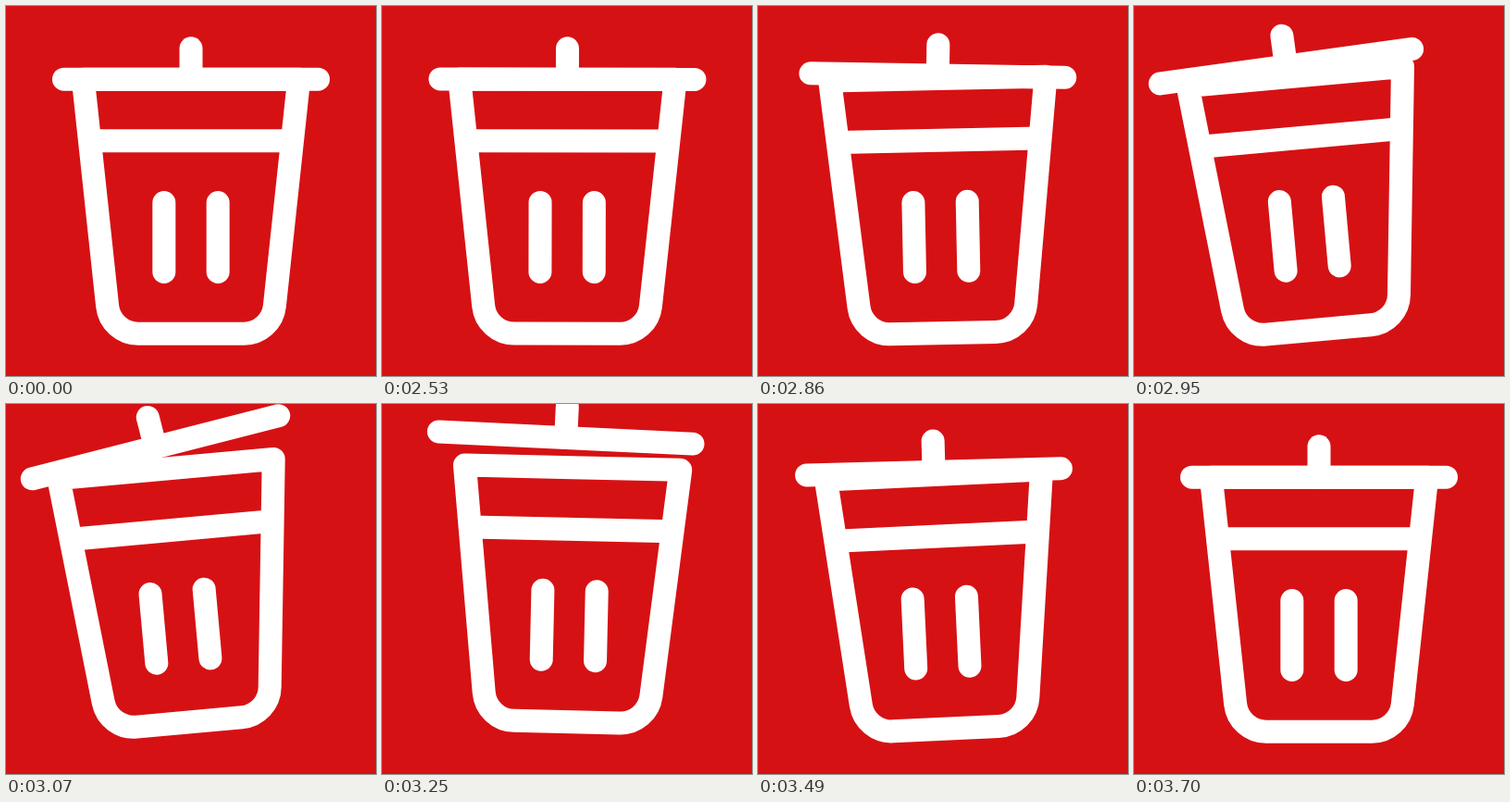
Animation, 400 px wide and 400 px high, one loop 3760 ms. Source, as an HTML page with a canvas:

```html
<!DOCTYPE html>
<html lang="en">
<head>
<meta charset="utf-8">
<title>Shaking bin</title>
<style>
  html, body { margin: 0; width: 100%; height: 100%; overflow: hidden; background: #d61114; }
  canvas { display: block; width: 100vmin; height: 100vmin; }
</style>
</head>
<body>
<canvas id="stage" width="400" height="400"></canvas>
<script>
const ctx = document.getElementById('stage').getContext('2d');
const LOOP = 3760, START = 2530, END = 3700, STEP = 30;
const RED = '#d61114', WHITE = '#fff';

// The icon sits on a 24-unit grid.
const UNIT = 400 / 24, FLOOR = 21.25 * UNIT, HEIGHT = 16.5 * UNIT;

// Cosine ease from one turning point [ms, value] to the next.
function swing(t, ...turns) {
  let [t0, value] = turns[0];
  for (const [t1, next] of turns.slice(1)) {
    const u = Math.min(1, Math.max(0, (t - t0) / (t1 - t0)));
    value += (next - value) * (1 - Math.cos(Math.PI * u)) / 2;
    if (u < 1) break;
    t0 = t1;
  }
  return value;
}

// A single arch from 0 to 1 and back; skew > 1 moves its peak later.
function arch(t, start, end, skew = 1) {
  const u = Math.min(1, Math.max(0, (t - start) / (end - start)));
  return Math.sin(Math.PI * u ** skew);
}

function line(x1, y1, x2, y2) {
  ctx.beginPath();
  ctx.moveTo(x1, y1);
  ctx.lineTo(x2, y2);
  ctx.stroke();
}

function placed(x, y, degrees, paint) {
  ctx.save();
  ctx.translate(x, y);
  ctx.rotate(degrees * Math.PI / 180);
  ctx.scale(UNIT, UNIT);
  paint();
  ctx.restore();
}

// Origin: middle of the bottom edge.
function drawBody() {
  ctx.beginPath();
  ctx.moveTo(0, -16.5);
  ctx.lineTo(-7, -16.5);
  ctx.arcTo(-5.23, 0, 0, 0, 2);
  ctx.arcTo(5.23, 0, 7, -16.5, 2);
  ctx.lineTo(7, -16.5);
  ctx.closePath();
  ctx.stroke();
  line(-6.5, -12.5, 6.5, -12.5);
  for (const x of [-1.75, 1.75]) line(x, -8.5, x, -4);
}

// Origin: middle of the lid bar.
function drawLid() {
  line(-8.25, 0, 8.25, 0);
  line(0, -2, 0, 0);
}

function draw(t) {
  const tilt = swing(t, [2515, 0], [2690, 5], [3005, -6], [3330, 2.5], [3505, -2.8], [3700, 0]);
  const lidTilt = swing(t, [2690, 0], [2860, 2.1], [3060, -9.2], [3290, 2.3], [3700, 0]);
  const drift = swing(t, [2860, 0], [3070, -2.1], [3490, 3], [3700, 0]);

  // Rocking onto a corner raises the middle; the hop adds to it.
  const sin = Math.sin(tilt * Math.PI / 180), cos = Math.sqrt(1 - sin * sin);
  const rock = 57 * sin * sin / (Math.abs(sin) + 0.02);
  const x = 200 + drift;
  const y = FLOOR - rock - 9.9 * arch(t, 2955, 3510);

  const lidX = -11.6 * arch(t, 2860, 3450, 0.6);
  const lidY = -32.7 * arch(t, 2765, 3450, 1.7) - 6.5 * arch(t, 3450, 3700);

  ctx.fillStyle = RED;
  ctx.fillRect(0, 0, 400, 400);
  ctx.strokeStyle = WHITE;
  ctx.lineWidth = 1.5;
  ctx.lineCap = ctx.lineJoin = 'round';
  placed(x, y, tilt, drawBody);
  placed(x + HEIGHT * sin + lidX, y - HEIGHT * cos + lidY, tilt + lidTilt, drawLid);
}

const origin = performance.now();
function tick() {
  const t = (performance.now() - origin) % LOOP;
  const held = t < START ? 0 : Math.min(END, START + STEP * Math.floor((t - START) / STEP));
  draw(held);
  requestAnimationFrame(tick);
}
tick();
</script>
</body>
</html>
```
